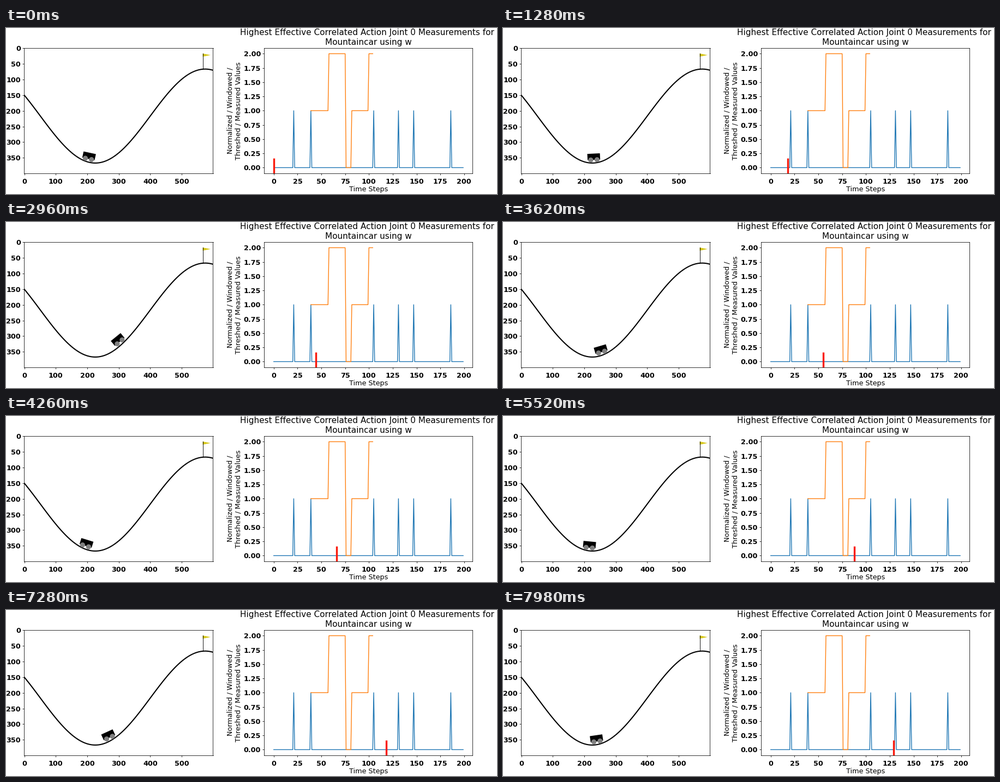
Write a matplotlib script that moves like this. It is 900 by 306 pixels and loops after 8000 ms.

```python
import numpy as np
import matplotlib.pyplot as plt
from matplotlib.animation import FuncAnimation
from matplotlib.patches import Circle, Polygon

W, H, DPI = 900, 306, 64
FRAMES, INTERVAL = 200, 40
LOOP = FRAMES * INTERVAL
SCALE = 600 / 1.8  # world units to screen pixels


def pt(px):
    return px * 72 / DPI


plt.rcParams.update({
    "font.family": "DejaVu Sans",
    "font.size": pt(12.75),
    "axes.labelpad": pt(3.6),
    "axes.linewidth": pt(0.8),
    "lines.linewidth": pt(1.4),
    "xtick.major.pad": pt(6.4),
    "ytick.major.pad": pt(3.2),
})
for axis in ("xtick", "ytick"):
    plt.rcParams[f"{axis}.major.size"] = pt(3.2)
    plt.rcParams[f"{axis}.major.width"] = pt(0.8)

fig = plt.figure(figsize=(W / DPI, H / DPI), dpi=DPI, facecolor="white")


def add_axes(x, y, w, h):
    return fig.add_axes([x / W, 1 - (y + h) / H, w / W, h / H])


def bold_ticks(ax):
    for label in ax.get_xticklabels() + ax.get_yticklabels():
        label.set_fontweight("bold")


def hill(pos):
    """Screen position of the track at a world position."""
    return (pos + 1.2) * SCALE, 400 - (0.45 * np.sin(3 * pos) + 0.55) * SCALE


# Throttle at each step: 0 left, 1 none, 2 right
throttle = np.ones(200, int)
for start, end, action in [(13, 20, 2), (22, 34, 2), (58, 76, 2), (76, 82, 0), (100, 106, 2)]:
    throttle[start:end] = action


def drive(pos, vel=0.0):
    """Mountain car physics: engine force plus gravity along the slope."""
    path = []
    for action in throttle:
        path.append(pos)
        vel += 0.001 * (action - 1) - 0.0025 * np.cos(3 * pos)
        pos += vel
    return path


path = drive(-0.5955)

# Scene with the hill, flag and car
scene = add_axes(33.3, 36.9, 346.2, 231)
scene.set_xlim(-0.5, 599.5)
scene.set_ylim(399.5, -0.5)
scene.set_xticks(range(0, 600, 100))
scene.set_yticks(range(0, 400, 50))
bold_ticks(scene)

scene.plot(*hill(np.linspace(-1.2, 0.6, 100)), color="black", lw=pt(2.1))
flag_x, flag_y = hill(0.5)
top = flag_y - 50
scene.plot([flag_x, flag_x], [flag_y, top], color="black", lw=pt(0.9))
scene.add_patch(Polygon([(flag_x, top), (flag_x, top + 10), (flag_x + 25, top + 5)],
                        color=(0.84, 0.78, 0.1), lw=0))

BODY = np.array([(-20, 10), (-20, 30), (20, 30), (20, 10)])
HUBS = np.array([(-10, 10), (10, 10)])
body = scene.add_patch(Polygon(BODY, color="black", lw=0, zorder=3))
wheels = [scene.add_patch(Circle(hub, 8, color="0.5", lw=0, zorder=4)) for hub in HUBS]

# Chart of the measurements
chart = add_axes(473.4, 36.9, 382, 231)
chart.set_xlim(-9.95, 208.95)
chart.set_ylim(-0.1, 2.1)
chart.set_xticks(range(0, 201, 25))
chart.set_yticks(np.arange(0, 2.1, 0.25))
chart.yaxis.set_major_formatter("{x:.2f}")
bold_ticks(chart)
chart.set_xlabel("Time Steps", labelpad=pt(1))
chart.set_ylabel("Normalized / Windowed /\nThreshed / Measured Values")

for x, y, line in [
    (661.9, 13.3, "Highest Effective Correlated Action Joint 0 Measurements for"),
    (664.4, 31.4, "Mountaincar using w"),
]:
    fig.text(x / W, 1 - y / H, line, ha="center", va="baseline", size=pt(15.25))

spikes = np.zeros(200)
spikes[[21, 39, 105, 131, 147, 186]] = 1
window = np.arange(39, 105)
chart.plot(spikes, color="C0")
chart.plot(window, throttle[window], color="C1")
marker, = chart.plot([0, 0], [-0.1, 0.17], color=(0.98, 0.1, 0.05), lw=pt(3.4),
                     solid_capstyle="butt", zorder=5)


def step_at(ms):
    """Playback starts a little slow, then catches up."""
    u = ms / LOOP
    return round(129.5 * u - 26.5 * u * (1 - u) ** 2)


def update(frame):
    step = step_at((frame + 0.5) * INTERVAL)
    pos = path[step]
    tilt = np.cos(3 * pos)
    c, s = np.cos(tilt), np.sin(tilt)
    turn = np.array([(c, -s), (-s, -c)])  # rotates, with y pointing down
    body.set_xy(BODY @ turn + hill(pos))
    for wheel, hub in zip(wheels, HUBS @ turn + hill(pos)):
        wheel.center = hub
    marker.set_xdata([step, step])
    return [body, *wheels, marker]


anim = FuncAnimation(fig, update, frames=FRAMES, interval=INTERVAL,
                     repeat=True, repeat_delay=0, blit=False)
plt.show()
```
